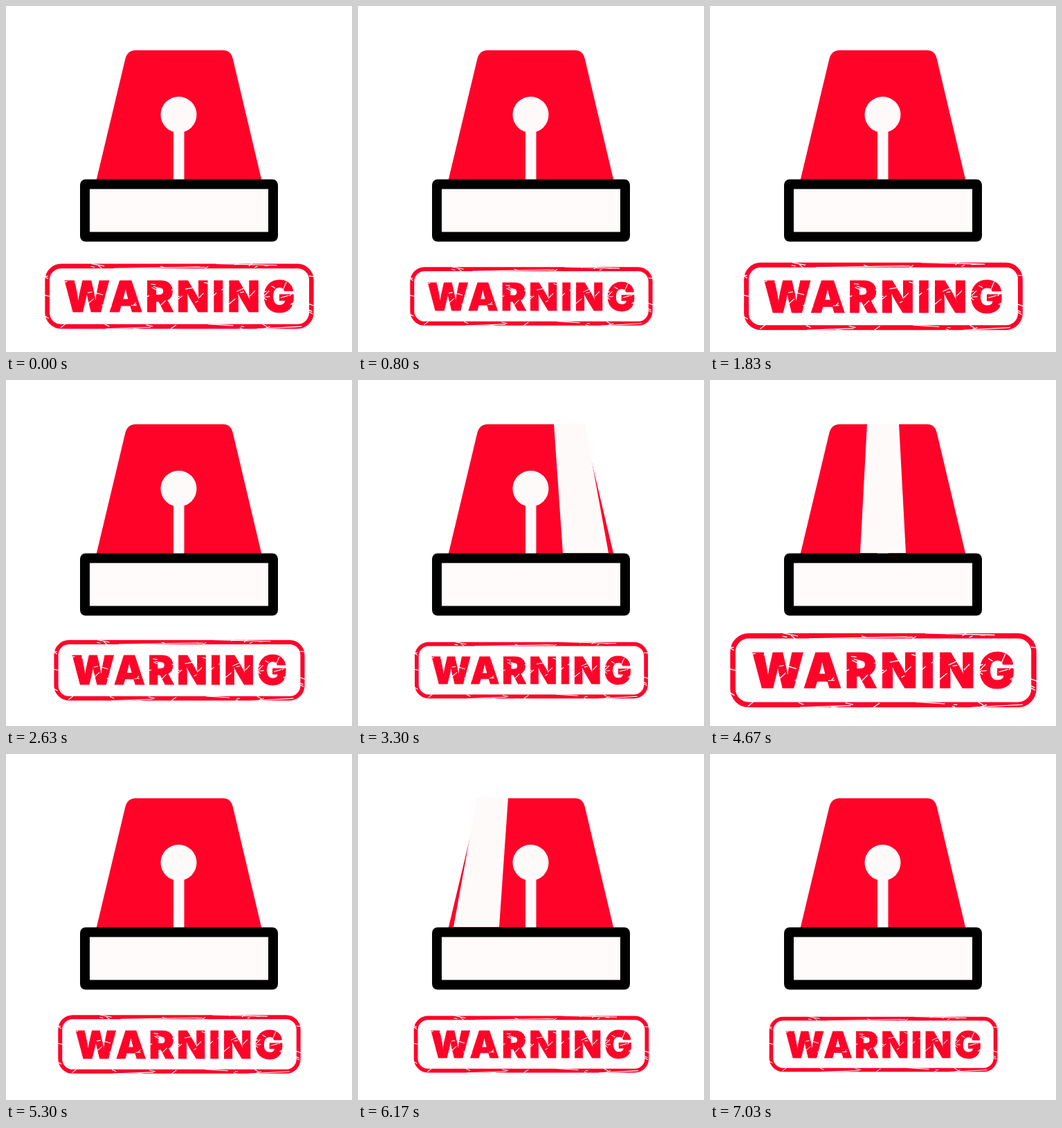
Write an HTML page that moves like this. It is 500 px wide and 500 px high and loops after 7.06 s.

```html
<!DOCTYPE html>
<html lang="en">
<head>
<meta charset="utf-8">
<title>Warning</title>
<style>
  html, body { margin: 0; width: 100%; height: 100%; overflow: hidden; background: #fff; }
  svg { display: block; width: 100vw; height: 100vh; }
  text { font: 900 52px Inter, "Open Sans", sans-serif; letter-spacing: 3.5px; text-anchor: middle; }
</style>
</head>
<body>
<svg viewBox="0 0 500 500">
  <path fill="#ff0329" d="M130 254 L172 78 Q175 64 187 64 H314 Q325 64 328 77 L369 250 V254 Z"/>
  <polygon id="beam" fill="#fffafa"/>
  <g fill="#fffafa">
    <circle cx="249.5" cy="157" r="26"/>
    <rect x="242" y="178" width="15.5" height="74"/>
  </g>
  <rect x="107" y="250.5" width="286" height="90" rx="8"/>
  <rect x="121" y="264.5" width="258" height="62" fill="#fffbfb"/>
  <g id="stamp">
    <rect x="-162" y="-37" width="324" height="74" rx="17" fill="none" stroke="#ff0329" stroke-width="5.6"/>
    <text x="1.75" y="19" fill="#ff0329" stroke="#ff0329" stroke-width="0.8">WARNING</text>
    <path id="scratches" fill="none" stroke="#fff"/>
  </g>
</svg>
<script>
const LOOP = 7060, FRAME = 100 / 3;
const PULSE = 27, RISE = 10;
const SWEEP = 49, SWEEP_DELAY = 2, DARK = 31, STEP = 6;
// The light crosses the dome from left to right
const BEAMS = [
  "172,63 217,63 204,250 138,250",
  "227,63 273,63 283,250 217,250",
  "283,63 328,63 362,250 296,250"
];
const $ = id => document.getElementById(id);
const beam = $("beam"), stamp = $("stamp");

let seed = 11;
const rand = (a, b) => {
  seed = seed * 16807 % 2147483647;
  return a + (b - a) * seed / 2147483647;
};
const scratch = (x, y, length, angle) =>
  `M${x} ${y}l${length * Math.cos(angle)} ${length * Math.sin(angle)}`;

// Worn stretches along the border, then random cracks and nicks
let wear = "M-108 -40L-92 -37M-80 -34L25 -36M45 -40L120 -38M-90 40L-35 38M35 34L66 36M95 40L150 37";
for (let i = 0; i < 40; i++)
  wear += scratch(rand(-142, 138), rand(-18, 18), rand(4, 13), rand(-1.2, 0.6));
for (let i = 0; i < 18; i++)
  wear += scratch(rand(-150, 150), (i % 2 ? 37 : -37) + rand(-3, 3), rand(3, 9), rand(-0.7, 0.7));
for (let i = 0; i < 8; i++)
  wear += scratch((i % 2 ? 159 : -165), rand(-25, 25), rand(4, 7), rand(-0.6, 0.6));
$("scratches").setAttribute("d", wear);

// Stamp width: quick accelerating growth, then a slowing shrink
function stampWidth(frame) {
  const d = (frame + 5) % PULSE;
  return d < RISE
    ? Math.min(443, 330 + 9.5 * d + 0.45 * d * d)
    : 330 + 113 * ((PULSE - d) / (PULSE - RISE)) ** 1.88;
}

function draw(now) {
  const frame = Math.floor((now % LOOP + 5) / FRAME);
  stamp.setAttribute("transform", `translate(250.5 419.5) scale(${stampWidth(frame) / 330})`);
  const phase = Math.max(0, frame - SWEEP_DELAY) % SWEEP;
  beam.setAttribute("points", BEAMS[Math.floor((phase - DARK) / STEP)] || "");
  requestAnimationFrame(draw);
}
draw(0);
</script>
</body>
</html>
```
